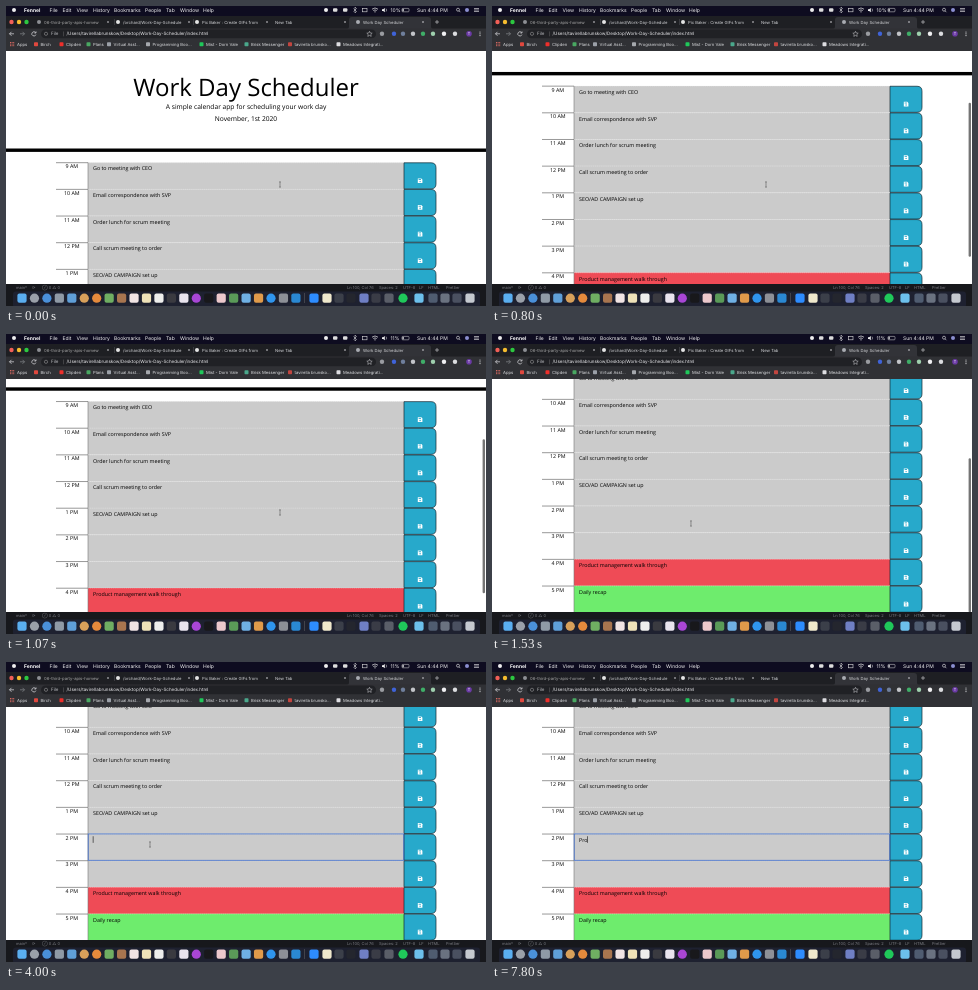
These frames come from a looping animation (480x300 px, 8 s). An HTML page:

```html
<!DOCTYPE html>
<html lang="en">
<head>
<meta charset="utf-8">
<title>Work Day Scheduler</title>
<style>
  html, body { margin: 0; width: 100%; height: 100%; overflow: hidden; background: #17181c; }
  svg { display: block; width: 100vw; height: 100vh; }
  text { white-space: pre; text-rendering: geometricPrecision; }
  .ui { font-family: Inter, Roboto, sans-serif; }
  .page { font-family: "Open Sans", "Noto Sans", sans-serif; }
</style>
</head>
<body>
<svg id="stage" viewBox="0 0 480 300"></svg>
<script>
const DURATION = 8000, ROW = 80 / 3, FIRST_ROW = 156.5, VIEW_TOP = 45, VIEW_BOTTOM = 278;
const MAX_SCROLL = 118, FOCUS_ROW = 5;

const rect = (x, y, w, h, fill, extra = '') =>
  `<rect x="${x}" y="${y}" width="${w}" height="${h}" fill="${fill}" ${extra}/>`;
const dot = (x, y, r, fill, extra = '') => `<circle cx="${x}" cy="${y}" r="${r}" fill="${fill}" ${extra}/>`;
const line = (d, stroke, width, extra = '') =>
  `<path d="${d}" fill="none" stroke="${stroke}" stroke-width="${width}" ${extra}/>`;
const text = (x, y, size, fill, str, extra = '') =>
  `<text x="${x}" y="${y}" font-size="${size}" fill="${fill}" ${extra}>${str}</text>`;
const centred = 'text-anchor="middle"';

function menuBar() {
  const menus = [[43.5, 'File'], [56.5, 'Edit'], [70.5, 'View'], [87, 'History'], [108, 'Bookmarks'],
    [139, 'People'], [160, 'Tab'], [174, 'Window'], [197, 'Help']];
  return rect(0, 0, 480, 10, '#0e0c20') + dot(8, 4, 2, '#eee') +
    text(18, 5.8, 5, '#fff', 'Fennel', 'font-weight="700"') +
    menus.map(([x, s]) => text(x, 5.8, 5, '#f2f2f2', s)).join('') +
    dot(320, 4, 2, '#eee') + rect(327, 2.2, 4.4, 3.6, '#ddd', 'rx="1"') + rect(337, 2.2, 4.4, 3.6, '#ddd', 'rx="1"') +
    line('M347.5 2.5l3 3l-1.5 1.5v-6l1.5 1.5l-3 3', '#eee', .5) +
    rect(356.5, 2.4, 4.5, 3.4, 'none', 'stroke="#ddd" stroke-width=".6"') +
    line('M366 3.2q3 -2.5 6 0M367.3 4.6q1.7 -1.4 3.4 0', '#eee', .7) + dot(369, 5.8, .6, '#eee') +
    '<path d="M376 3.3h1.2l1.6-1.3v4.2l-1.6-1.3h-1.2z" fill="#eee"/>' + line('M380 2.6q1.3 1.5 0 3', '#eee', .5) +
    text(384.5, 5.8, 5, '#f2f2f2', '10%', 'id="battery"') +
    rect(396, 2.4, 7, 3.4, 'none', 'stroke="#ddd" stroke-width=".5" rx=".8"') + rect(396.5, 2.9, 1.2, 2.4, '#eee') +
    text(411, 5.8, 5, '#f2f2f2', 'Sun 4:44 PM') +
    dot(452, 3.7, 1.5, 'none', 'stroke="#eee" stroke-width=".6"') + line('M453 4.8l1.4 1.4', '#eee', .6) +
    dot(461, 4, 2, '#8b8fd0') + line('M468 2.5h5M468 4h5M468 5.5h5', '#eee', .6);
}

function tabBar() {
  const tabs = [[33, 102, '#8d8f94', '06-third-party-apis-homew', '#aaa'], [112, 183, '#e4e4e4', '/orchard/Work-Day-Schedule'],
    [191, 261, '#e4e4e4', 'Pic Baker : Create GIFs from'], [264, 339, 'none', 'New Tab'],
    [352, 417, '#a9acb2', 'Work Day Scheduler']];
  return rect(0, 10, 480, 13, '#1e1f23') +
    ['#f25f57', '#f6bd2f', '#2cc840'].map((c, i) => dot(5.5 + i * 7.5, 16, 2.2, c)).join('') +
    '<path d="M341 23q2 0 2-3v-6q0-3 3-3h76q3 0 3 3v6q0 3 2 3z" fill="#323338"/>' +
    [108, 187].map(x => rect(x, 13, .5, 6, '#55575c')).join('') +
    tabs.map(([x, close, c, s, fill = '#d6d7da']) => dot(x, 16, 2, c) + text(x + 5, 17.6, 4.2, fill, s) +
      line(`M${close - 1} 15l2 2m0 -2l-2 2`, '#c8c9cc', .5)).join('') +
    line('M429 16h4m-2 -2v4', '#d0d0d3', .6);
}

function toolbar() {
  const extensions = [[376, '#9a9ca1'], [388, '#3f63d8'], [397, '#6f7f9c'], [407, '#c3c5c9'],
    [417, '#3fae68'], [427, '#9fd0ae'], [438, '#f0f0f2'], [449, '#dcdde0']];
  return rect(0, 22.5, 480, VIEW_TOP - 22.5, '#303135') +
    line('M8 27.8h-4.5m2 -2l-2 2l2 2', '#dedfe2', .7) + line('M14 27.8h4.5m-2 -2l2 2l-2 2', '#85878c', .7) +
    line('M29.6 26.6a2.1 2.1 0 1 0 .3 2M30 25.4v1.6h-1.6', '#dedfe2', .7) +
    rect(35, 23.6, 335, 8.6, '#202125', 'rx="4.3"') +
    dot(40, 27.8, 1.6, 'none', 'stroke="#aaa" stroke-width=".5"') +
    text(45, 29.4, 4.5, '#b6b8bc', 'File') + rect(57, 25.5, .4, 4.8, '#777') +
    text(60.5, 29.4, 4.5, '#ececef', '/Users/tavirellabrunskow/Desktop/Work-Day-Scheduler/index.html') +
    '<path d="M363.5 25.3l.8 1.7l1.9.2l-1.4 1.3l.4 1.9l-1.7-1l-1.7 1l.4-1.9l-1.4-1.3l1.9-.2z" fill="none" stroke="#d4d5d9" stroke-width=".5"/>' +
    extensions.map(([x, c]) => dot(x, 27.8, 2.2, c)).join('') +
    dot(463, 27.8, 2.8, '#6b3aa5') + text(463, 29.2, 3.8, '#fff', 'T', centred) +
    [26, 27.8, 29.6].map(y => dot(474, y, .6, '#dedfe2')).join('');
}

function bookmarks() {
  const marks = [[34.5, '#e0483e', 'Birch'], [60, '#ee2f2b', 'Clipden'], [87, '#49a862', 'Plans'],
    [107.5, '#9ba0a8', 'Virtual Asst...'], [146.5, '#a5a8ad', 'Programming Boo...'], [200, '#1fc85a', 'Mist - Dorn Vale'],
    [245, '#4aa88c', 'Brisk Messenger'], [288.5, '#c2453f', 'tavirella brunsko...'], [337, '#dedee2', 'Meadows Integrati...']];
  const grid = [0, 1, 2].flatMap(r => [0, 1, 2].map(c => rect(4 + c * 1.6, 36 + r * 1.6, 1, 1, '#d36860'))).join('');
  return grid + text(11, 39.8, 4.2, '#dfe0e3', 'Apps') +
    marks.map(([x, c, s]) => rect(x - 6.5, 36.3, 4, 4, c, 'rx=".8"') + text(x, 39.8, 4.2, '#dfe0e3', s)).join('');
}

function scheduleRow([hour, task, fill], i) {
  return `<g transform="translate(0 ${FIRST_ROW + i * ROW})">` +
    rect(82, 0, 316, ROW, fill) + line('M82 .2h316', '#fff', .5, 'opacity=".5" stroke-dasharray="1.2 .7"') +
    line('M50 .2h32', '#555', .6) + line(`M82 0v${ROW}`, '#777', .6) +
    text(65.8, 5.8, 16 / 3, '#000', hour, centred) + text(87, 7.9, 16 / 3, '#000', task) +
    `<path d="M398 .3h27q5 0 5 5v${ROW - 10.6}q0 5-5 5h-27z" fill="#27a9cb" stroke="#12262e" stroke-width=".7"/>` +
    '<path d="M411.8 15.9h3.5l1.1 1.1v3.6h-4.6z" fill="#fff"/>' +
    rect(412.6, 16.6, 2.4, .9, '#27a9cb') + dot(414.1, 19.1, .7, '#27a9cb') + '</g>';
}

function page() {
  const past = '#cbcbcb';
  const rows = [['9 AM', 'Go to meeting with CEO', past], ['10 AM', 'Email correspondence with SVP', past],
    ['11 AM', 'Order lunch for scrum meeting', past], ['12 PM', 'Call scrum meeting to order', past],
    ['1 PM', 'SEO/AD CAMPAIGN set up', past], ['2 PM', '', past], ['3 PM', '', past],
    ['4 PM', 'Product management walk through', '#ef4b56'], ['5 PM', 'Daily recap', '#6eec6d']];
  const y = FIRST_ROW + FOCUS_ROW * ROW;
  return rect(0, VIEW_TOP, 480, VIEW_BOTTOM - VIEW_TOP, '#fff') +
    `<g clip-path="url(#view)"><g id="content">` +
    text(240, 89.7, 24, '#000', 'Work Day Scheduler', centred) +
    text(240, 102.8, 20 / 3, '#000', 'A simple calendar app for scheduling your work day', centred) +
    text(240, 114.8, 20 / 3, '#000', 'November, 1st 2020', centred) +
    rect(0, 142.5, 480, 3.4, '#000') + rows.map(scheduleRow).join('') +
    rect(82.2, y + .1, 315.6, ROW - .3, 'none', 'id="ring" stroke="#3d6ccb" stroke-width=".8"') +
    text(87, y + 7.9, 16 / 3, '#000', '', 'id="typed"') + rect(87, y + 2.4, .6, 6.6, '#111', 'id="caret"') +
    '</g>' + rect(476.6, 0, 2.4, 154, '#757575', 'id="scrollbar" rx="1.2"') + '</g>' +
    line('M-.9 -2.3q.9 0 .9 .6q0 -.6 .9 -.6M0 -1.8v4.6M-.9 3.3q.9 0 .9 -.6q0 .6 .9 .6', '#444', .5, 'id="pointer"');
}

function footer() {
  const status = [[10, 'main*'], [26, '⟳'], [36, '⊘ 0 △ 0'], [341, 'Ln 100, Col 76'], [373, 'Spaces: 2'],
    [397, 'UTF-8'], [413, 'LF'], [422, 'HTML'], [440, 'Prettier']];
  const icons = ['#5aaef0', '#9aa0a9', '#4a90d9', '#8f9aa6', '#5f9fd8', '#d8a05a', '#e58a3c', '#6fae62', '#a8754f',
    '#f1e4e4', '#efe2b8', '#eeeeec', '#3a3a40', '#e9e4ee', '#a846d6', '#18181b', '#ecc8cc', '#5a9a58', '#6fb0e4',
    '#e09a4a', '#2f95ee', '#8d9097', '#2a88d2'];
  const round = [1, 2, 5, 6, 14, 20];
  const recent = [[308, '#2d8cff'], [321, '#efe8cc'], [333, '#3b3f49'], [345, '#24262e'],
    [358, '#6f7fc4'], [370, '#3a3c46'], [383, '#5a5e68'], [397, '#1fc85a'], [413, '#6cc0ec'],
    [427, '#4f5c70'], [439, '#6a7280'], [451, '#4a5060'], [464, '#c5c9d0']];
  const icon = (x, c, isRound) => rect(x - 4.6, 287.6, 9.2, 9.2, c, `rx="${isRound ? 4.6 : 2}"`);
  return rect(0, VIEW_BOTTOM, 480, 22, '#17181c') +
    status.map(([x, s]) => text(x, 282.8, 4, '#7b7d83', s)).join('') +
    rect(7, 285.5, 467, 16, '#1e2130', 'rx="3"') +
    icons.map((c, i) => icon(16 + i * 12.45, c, round.includes(i))).join('') + rect(298.5, 287, .5, 10, '#666') +
    recent.map(([x, c]) => icon(x, c, x === 397)).join('');
}

const stage = document.getElementById('stage');
stage.innerHTML =
  `<clipPath id="view">${rect(0, VIEW_TOP, 480, VIEW_BOTTOM - VIEW_TOP, '#000')}</clipPath>` +
  `<g class="page">${page()}</g><g class="ui">${menuBar()}${tabBar()}${toolbar()}${bookmarks()}${footer()}</g>`;
const part = Object.fromEntries([...stage.querySelectorAll('[id]')].map(el => [el.id, el]));

// Keys are [time, value]; values between keys are linear.
function track(keys, t) {
  if (t <= keys[0][0]) return keys[0][1];
  for (let i = 1; i < keys.length; i++) {
    const [t0, a] = keys[i - 1], [t1, b] = keys[i];
    if (t < t1) return a + (b - a) * (t - t0) / (t1 - t0);
  }
  return keys[keys.length - 1][1];
}

const scrollKeys = [[470, 0], [530, 8], [600, 32], [670, 56], [730, 69], [800, 76.5], [1000, 85.5],
  [1070, 89], [1200, 110], [1270, MAX_SCROLL]];
const pointerX = [[1335, 274], [1530, 199], [1930, 182], [2135, 182], [2600, 144]];
const pointerY = [[1335, 178], [1530, 189], [1930, 190], [2135, 190], [2600, 182]];
const barOpacity = [[470, 0], [530, 1], [1770, 1], [1930, 0]];
const typing = [[7070, 'P'], [7600, 'Pr'], [7730, 'Pro']];

const show = (el, visible) => el.setAttribute('visibility', visible ? 'visible' : 'hidden');

function draw(t) {
  const scroll = track(scrollKeys, t);
  part.content.setAttribute('transform', `translate(0 ${-scroll})`);
  const viewHeight = VIEW_BOTTOM - VIEW_TOP;
  part.scrollbar.setAttribute('y', VIEW_TOP + 1 + scroll / (viewHeight + MAX_SCROLL) * viewHeight);
  part.scrollbar.setAttribute('opacity', track(barOpacity, t));
  part.pointer.setAttribute('transform', `translate(${track(pointerX, t)} ${track(pointerY, t)})`);

  const typed = typing.filter(([at]) => t >= at).map(([, s]) => s).pop() || '';
  part.typed.textContent = typed;
  part.caret.setAttribute('x', 86.8 + (typed && part.typed.getComputedTextLength()));
  const blinkOn = (t - 2995) % 1000 < 470;
  show(part.pointer, !typed);
  show(part.ring, t >= 2995);
  show(part.caret, t >= 2995 && (t >= 7600 || blinkOn || (t >= 7070 && t < 7530)));
  part.battery.textContent = t < 995 ? '10%' : '11%';
}

function tick() {
  draw(performance.now() % DURATION);
  requestAnimationFrame(tick);
}
tick();
</script>
</body>
</html>
```
